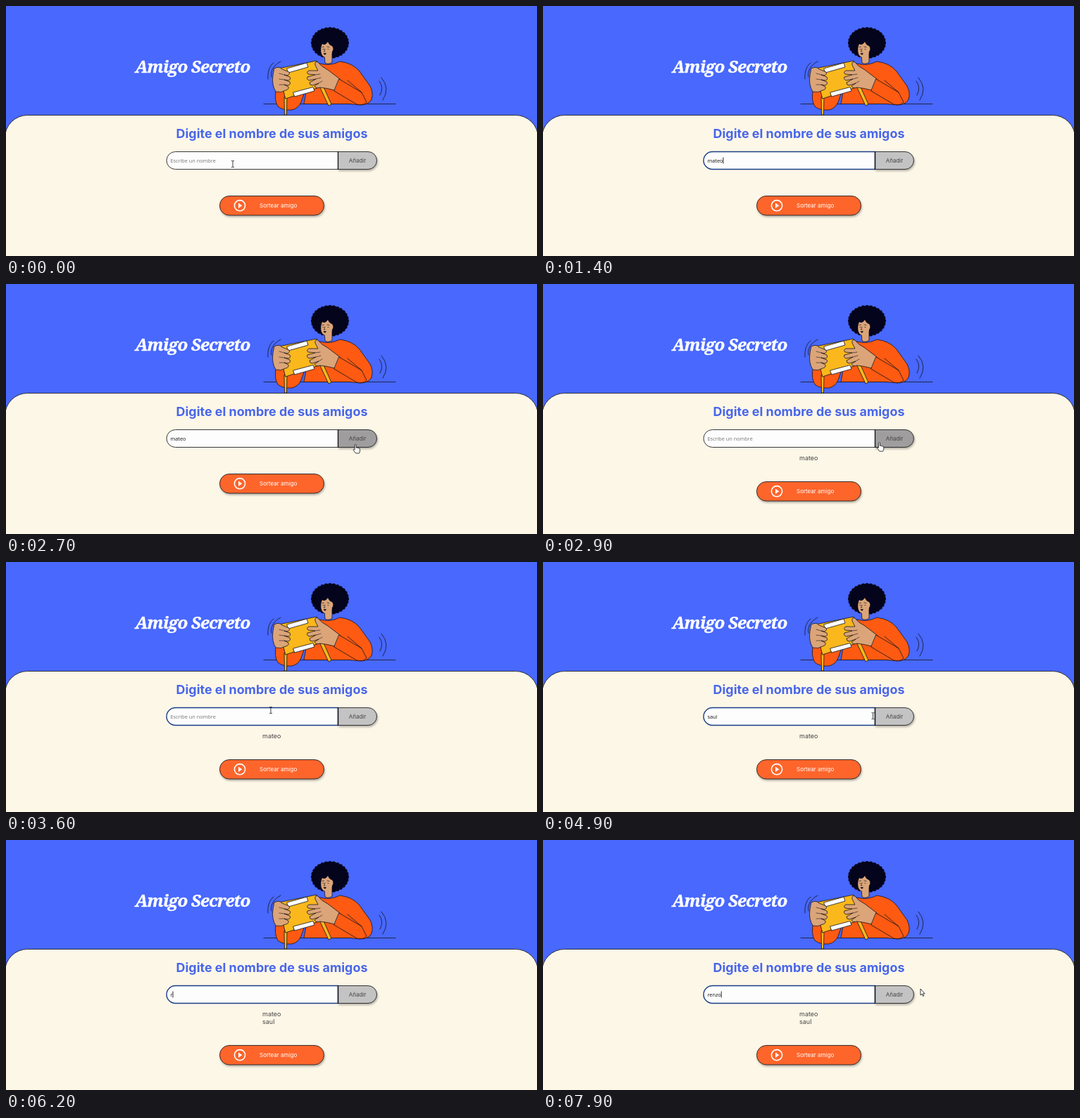
An HTML page for the animation above (8000 ms loop, 754 by 356 pixels).

```html
<!DOCTYPE html>
<html lang="es">
<head>
<meta charset="utf-8">
<title>Amigo Secreto</title>
<style>
  html, body { margin: 0; height: 100%; overflow: hidden; background: #4868fe; }
  svg { display: block; width: 754px; height: 356px; }
  text { font: 8px Inter, sans-serif; fill: #444; }
  .title { font: italic 700 24px "Noto Serif", serif; letter-spacing: -.9px; fill: #fff; stroke: #fff; stroke-width: .4; }
  .heading { font: 700 17.9px Inter, sans-serif; fill: #4866ea; }
  .field { font: 7.3px "Open Sans", sans-serif; fill: #111; }
  .hint { fill: #757575; }
  .list text { font-size: 9px; }
  .edge { stroke: #222; stroke-width: .9; }
  .shadow { filter: drop-shadow(1px 2px 1.5px rgba(0, 0, 0, .3)); }
  .art { stroke: #15151f; stroke-width: .8; stroke-linejoin: round; stroke-linecap: round; }
  .skin { fill: #dba579; }
  .shirt { fill: #ff5a12; }
  .gift { fill: #fab81c; }
  .line { fill: none; }
</style>
</head>
<body>
<svg viewBox="0 0 754 356">
  <rect width="754" height="356" fill="#4868fe"/>
  <text class="title" x="265" y="95" text-anchor="middle">Amigo Secreto</text>

  <g class="art">
    <path class="line" d="M366 139.500H553"/>
    <path class="line" d="M372 104C371 93 375 84 380 81M377 101C375 93 380 84 390 79M533 102Q546 117 535 134M530 107Q537 116 531 127"/>
    <path class="shirt" d="M446 82Q460 86 474 79Q492 81 502 93L517 114Q522 124 519 133Q515 141 503 141L488 139.500H423L428 112L440 84Z"/>
    <g id="hair" fill="#04041c" stroke="none"></g>
    <path class="skin" d="M452 68L453 81Q458 84 463 80V62Z"/>
    <path class="skin" stroke="none" d="M449 54Q453 57 457 51Q459 56 463 57Q466 61 463 65Q462 71 457 73Q450 74 448 68Q446 61 449 54Z"/>
    <path class="line" stroke-width=".7" d="M449 58.500l2.500-.5M456 58l3 .5M450 61.500h1M457 61.500h1M453 61l-1.500 4h1.500"/>
    <path fill="#15151f" stroke="none" d="M450.500 67.500q2.500-1 4.500 0q-2 4-4.500 0Z"/>
    <path class="shirt" d="M383 122Q381 135 386 143Q393 149 406 148Q415 146 419 137L425 120L400 116Z"/>
    <path class="gift" d="M395 130L395.500 155H398.500L399 130ZM445 114L458 142L462 140L449 111Z"/>
    <path class="gift" d="M387 89L441 78L450 114L397 132Z"/>
    <path fill="#fff" d="M399 89L427 81L429 87L401 95ZM408 123L436 115.500L438 121L410 129Z"/>
    <path class="skin" d="M381 89Q388 85 392 90L402 94Q404 97 400 99L395 98L403 101Q405 105 401 106L395 105L403 108Q405 112 400 113L395 112L401 115Q402 119 397 120Q391 124 383 122Q377 112 379 99Z"/>
    <path class="line" stroke-width=".6" d="M395 98l-7-2M395 105l-7-1M395 112l-7 0"/>
    <path class="skin" d="M474 104L457 91Q447 86 443 80Q438 78 439 84L443 92L430 92Q426 94 429 97L439 98L428 101Q426 104 430 106L440 104L431 109Q431 113 435 113L444 110L438 114Q440 118 446 116Q456 117 467 120Z"/>
    <path class="line" stroke-width=".6" d="M439 98l7-1M440 104l7-2M444 110l5-3"/>
    <path class="shirt" d="M473 104L505 123L512 137Q508 142 498 140L466 121Z"/>
    <path class="line" d="M485 106L505 123"/>
  </g>

  <path class="edge" d="M-1.500 357V187.500A32 32 0 0 1 30.500 155.500H723.500A32 32 0 0 1 755.500 187.500V357Z" fill="#fdf7e8"/>
  <text class="heading" x="377.500" y="188" text-anchor="middle">Digite el nombre de sus amigos</text>

  <path id="add" class="shadow edge" d="M471.500 207.500H514A12.500 12.500 0 0 1 514 232.500H471.500Z"/>
  <text x="499" y="222.700" text-anchor="middle">Añadir</text>
  <path id="box" d="M471.500 207.500H240.500A12.500 12.500 0 0 0 240.500 232.500H471.500Z" fill="#fefdfe"/>
  <path d="M471.500 207V233" stroke="#111" stroke-width="1.300"/>
  <text id="hint" class="field hint" x="233.500" y="222.700">Escribe un nombre</text>
  <text id="typed" class="field" x="233.500" y="222.700"></text>
  <path id="caret" d="M0 215.500V224.500" stroke="#111" stroke-width=".9"/>

  <g class="list">
    <text x="364" y="251"></text>
    <text x="364" y="262"></text>
  </g>

  <g id="draw">
    <rect class="shadow edge" x="303.500" y="270.500" width="148" height="27.500" rx="13.500" fill="#fe652b"/>
    <circle cx="332" cy="284.200" r="7.600" fill="none" stroke="#fff" stroke-width="1.600"/>
    <path d="M330 280.500V288L335.300 284.200Z" fill="#fff"/>
    <text x="360" y="287.200" style="fill:#fff">Sortear amigo</text>
  </g>

  <g id="cursor" stroke="#111" stroke-width=".8" stroke-linejoin="round" fill="#fff">
    <path id="beam" fill="none" d="M-2-4.500H-.5L0-4L.5-4.500H2M0-4V4M-2 4.500H-.5L0 4L.5 4.500H2"/>
    <path id="hand" d="M-.8 0Q.4-1.200 1.200 0V4.200Q2.500 3.400 3.200 4.600Q4.600 4 5 5.200Q6.600 4.800 6.600 6.500V9Q6.200 10.500 5.500 12H.6L-2.800 7.500Q-2.800 5.800-.8 7Z"/>
    <path id="arrow" d="M0 0V9L2 7.200L3.500 10.500L4.900 9.900L3.500 6.800H6.200Z"/>
  </g>
</svg>
<script>
const LOOP = 8000, TICK = 100;
const $ = id => document.getElementById(id);
const show = (el, on) => el.style.display = on ? '' : 'none';
const within = (spans, t) => spans.some(([from, to]) => t >= from && t < to);

const entries = [
  { name: 'mateo', keys: [1000, 1100, 1200, 1300, 1400], added: 2800 },
  { name: 'saul', keys: [3700, 3900, 4000, 4100], added: 5100 },
  { name: 'renzo', keys: [6200, 6400, 6500, 6700, 7000], added: LOOP },
];
const focused = [[300, 2600], [3100, 5000], [5600, LOOP]];
const pointerHidden = [[1000, 2000], [3700, 4700], [6200, 7600]];
const blinkStarts = [300, 1000, 1300, 3100, 3700, 4200, 5700, 6200, 6500, 6800];
const path = [ // time, x, y
  [0, 322, 225], [2000, 322, 225], [2500, 496, 229], [2800, 496, 229],
  [3200, 376, 211], [4700, 376, 211], [5000, 501, 222], [5300, 515, 224],
  [5500, 410, 217], [7500, 410, 217], [7600, 565, 210], [7900, 536, 212], [LOOP, 536, 212],
];
const rows = document.querySelectorAll('.list text');

// Curly outline: small discs around a solid core
const disc = (x, y, r) => `<circle cx="${x}" cy="${y}" r="${r}"/>`;
let curls = '<ellipse cx="460" cy="52.500" rx="25.500" ry="21"/>';
for (let i = 0; i < 28; i++) {
  const a = i * Math.PI / 14;
  curls += disc(460 + 24 * Math.cos(a), 52.5 + 19.5 * Math.sin(a), 3);
}
$('hair').innerHTML = curls;

function pointerAt(t) {
  const i = path.findIndex(p => p[0] > t);
  const [t0, x0, y0] = path[i - 1], [t1, x1, y1] = path[i];
  const k = (t - t0) / (t1 - t0), e = k * k * (3 - 2 * k);
  return [x0 + (x1 - x0) * e, y0 + (y1 - y0) * e];
}

function render(t) {
  const entry = entries.find(e => t < e.added);
  const text = entry.name.slice(0, entry.keys.filter(k => k <= t).length);
  const focus = within(focused, t);
  $('typed').textContent = text;
  show($('hint'), !text);
  $('box').setAttribute('stroke', focus ? '#183c86' : '#222');
  $('box').setAttribute('stroke-width', focus ? 1.4 : .9);

  const blink = blinkStarts.filter(b => b <= t).pop() ?? 0;
  show($('caret'), focus && Math.floor((t - blink) / 500) % 2 === 0);
  const caretX = 234 + (text ? $('typed').getComputedTextLength() : 0);
  $('caret').setAttribute('transform', `translate(${caretX})`);

  const added = entries.filter(e => e.added <= t);
  rows.forEach((row, i) => row.textContent = added[i]?.name ?? '');
  $('draw').setAttribute('transform', `translate(0 ${added.length * 11})`);

  const [x, y] = pointerAt(t);
  const inRow = y > 207 && y < 233;
  const visible = !within(pointerHidden, t);
  const overBox = inRow && x > 228 && x < 472;
  const overAdd = inRow && x >= 472 && x < 527;
  show($('cursor'), visible);
  show($('beam'), overBox);
  show($('hand'), overAdd);
  show($('arrow'), !overBox && !overAdd);
  $('cursor').setAttribute('transform', `translate(${x} ${y})`);
  $('add').setAttribute('fill', visible && overAdd ? '#9f9d9d' : '#c4c3c3');
}

const start = performance.now();
function frame() {
  const t = (performance.now() - start) % LOOP;
  render(Math.floor(t / TICK) * TICK);
  requestAnimationFrame(frame);
}
frame();
</script>
</body>
</html>
```
